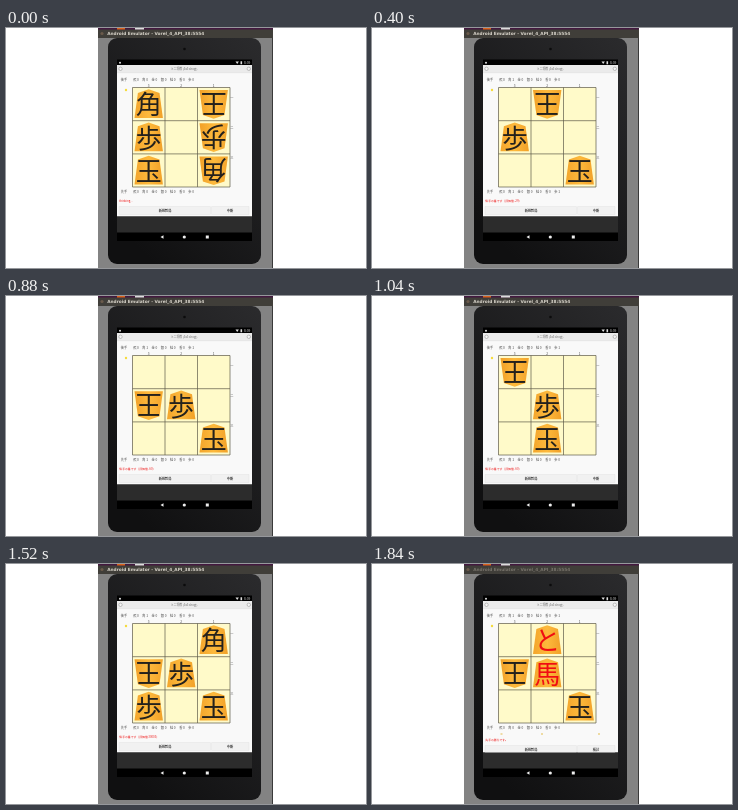
An HTML page that plays this animation: 360x240 px, repeating every 1.92 s.

```html
<!DOCTYPE html>
<html lang="ja">
<head>
<meta charset="utf-8">
<title>3x3 shogi</title>
<style>
html, body { margin: 0; width: 100%; height: 100%; overflow: hidden; background: #fff; }
svg { display: block; width: 360px; height: 240px; }
text { font-family: "Noto Sans CJK JP", "Noto Sans CJK", "Noto Sans", sans-serif; }
.tiny { font-size: 3.2px; fill: #444; }
.mid { text-anchor: middle; }
.title { font-size: 2.9px; fill: #666; }
.caption { font: 700 4.3px "DejaVu Sans", sans-serif; fill: #d8d4ca; }
.piece text { font-size: 26px; font-weight: 500; text-anchor: middle; fill: #24211c; }
.piece.up text { fill: #f00d12; }
.over .caption { fill: #77736b; }
.over #note, .over #buttons { transform: translateY(3px); }
#marks { display: none; }
.over #marks { display: inline; }
</style>
</head>
<body>
<svg id="stage" viewBox="0 0 360 240">
  <defs>
    <linearGradient id="wood" x2="1" y2="0">
      <stop offset="0" stop-color="#f3a52c"/>
      <stop offset=".5" stop-color="#fdb93c"/>
      <stop offset="1" stop-color="#f1a028"/>
    </linearGradient>
    <linearGradient id="body" x1="1" y1="0" x2=".3" y2="1">
      <stop offset="0" stop-color="#2b2b2d"/>
      <stop offset="1" stop-color="#101011"/>
    </linearGradient>
  </defs>

  <!-- emulator window -->
  <rect x="92" width="175" height="240" fill="#838383"/>
  <rect x="266" width="1" height="240" fill="#3a3a3a"/>
  <rect x="92" width="175" height="10" fill="#403e39"/>
  <rect x="92" width="175" height="1.500" fill="#43183f"/>
  <rect x="111" width="8" height="1.500" fill="#d9641e"/>
  <rect x="129" width="9" height="1.500" fill="#ddd"/>
  <circle cx="96" cy="5.500" r="1.600" fill="#6b5a4b"/>
  <text class="caption" x="101.200" y="7.400">Android Emulator - Vorel_4_API_38:5554</text>

  <!-- tablet -->
  <rect x="102" y="10" width="153" height="226" rx="9" fill="url(#body)"/>
  <circle cx="178.500" cy="21" r="1.300" fill="#0b0b0c"/>
  <rect x="111" y="31.500" width="135" height="181.500" fill="#000"/>
  <g fill="#ddd">
    <circle cx="114" cy="34.700" r="1"/>
    <path d="M229.500 33.500h3.400l-1.700 2.600zM234.500 33.300h1.600v3h-1.600z"/>
    <text x="238" y="36.200" font-size="3.300">8:39</text>
  </g>
  <rect x="111" y="188" width="135" height="16.500" fill="#2c2c2c"/>
  <g fill="#eee">
    <path d="M154.500 209l3-1.700v3.400z"/>
    <circle cx="178.300" cy="209" r="1.600"/>
    <rect x="199.800" y="207.500" width="3" height="3"/>
  </g>

  <!-- app -->
  <rect x="111" y="37" width="135" height="151.500" fill="#f9f9f9"/>
  <rect x="111" y="37" width="135" height="7.500" fill="#ebebeb"/>
  <path d="M111 44.700h135" stroke="#d6d6d6" stroke-width=".5"/>
  <g fill="#f6f6f6" stroke="#888" stroke-width=".5">
    <circle cx="114.500" cy="40.800" r="1.700"/>
    <circle cx="242.800" cy="40.800" r="1.700"/>
  </g>
  <text class="title mid" x="178" y="41.900">ミニ将棋 (3x3 shogi)</text>
  <text class="tiny mid" x="118" y="52.500">後手</text>
  <text class="tiny mid" x="118" y="164.500">先手</text>
  <g id="buttons">
    <path d="M113 178.500h91.500v8h-91.500zM205.500 178.500h37.500v8h-37.500z" fill="#f1f1f1" stroke="#dedede" stroke-width=".4"/>
    <text class="tiny mid" x="159" y="183.800" font-weight="700">新規対局</text>
    <text class="tiny mid" x="224" y="183.800" font-weight="700" id="stop"></text>
  </g>
  <rect x="111" y="188.500" width="135" height="3" fill="#2c2c2c"/>
  <g id="hands"></g>
  <circle cx="120" cy="62" r="1.200" fill="#f5dc3c"/>
  <path id="marks" d="M128.500 169.500h2v1h-2zM169 169.500h2v1h-2zM226 169.500h2v1h-2z" fill="#e3bd4e"/>
  <text x="113.300" y="174" font-size="2.850" fill="#e11" id="note"></text>

  <rect x="126.500" y="59.500" width="97.500" height="99.500" fill="#fffac9"/>
  <path d="M126.500 59.500h97.500v99.500h-97.500zM159 59.500v99.500M191.500 59.500v99.500M126.500 92.700h97.500M126.500 125.900h97.500" fill="none" stroke="#5d5a48" stroke-width=".7"/>
  <g id="labels"></g>
  <g id="board"></g>
</svg>
<script>
const STEP = 80, COUNT = 24;
const KINDS = [..."飛角金銀桂香歩"];
const UP = { 歩: "と", 角: "馬" };
const BASE = { と: "歩", 馬: "角" };
const $ = id => document.getElementById(id);

// Column and row pairs; "*" drops from hand, "+" promotes.
const MOVES = ("00-22+ 20-10 02-12 21-22+ 12-22 10-01 角*11 角*02 歩*12 02-11+ 12-11 01-00 " +
  "22-12 歩*21 角*20 21-22+ 12-22 00-01 歩*02 01-02 11-10+ 02-01 20-11+").split(" ");
const SCORES = [-29, -29, -29, -44, -100, -60, -60, -82, 30001, 30003, 30003];

function play(state, move, side) {
  const cells = { ...state.cells };
  const hands = state.hands.map(h => ({ ...h }));
  const [from, to] = move.replace("+", "").split(/[-*]/);
  let { kind } = cells[from] || { kind: from };
  if (move.includes("*")) hands[side][kind]--;
  else delete cells[from];
  const taken = cells[to];
  if (taken) {
    const k = BASE[taken.kind] || taken.kind;
    hands[side][k] = (hands[side][k] || 0) + 1;
  }
  if (move.endsWith("+")) kind = UP[kind];
  cells[to] = { kind, side };
  return { cells, hands };
}

const start = { cells: {}, hands: [{}, {}] };
[..."角歩玉"].forEach((kind, r) => start.cells["0" + r] = { kind, side: 0 });
[..."王歩角"].forEach((kind, r) => start.cells["2" + r] = { kind, side: 1 });
const states = [start];
MOVES.forEach((m, i) => states.push(play(states[i], m, i % 2)));

function drawPiece(pos, { kind, side }) {
  const x = 142.7 + 32.5 * pos[0], y = 76 + 33.2 * pos[1];
  return `<g class="piece ${BASE[kind] ? "up" : ""}" transform="translate(${x} ${y}) rotate(${side * 180})">
    <path d="M0-14.700L10.800-11L14.200 14H-14.200L-10.800-11z" fill="url(#wood)"/>
    <text y="10.300">${kind}</text></g>`;
}

function drawHand(hand, y) {
  return KINDS.map((k, i) =>
    `<text class="tiny mid" x="${130 + i * 9.2}" y="${y}">${k} ${hand[k] || 0}</text>`).join("");
}

function note(n) {
  if (n === COUNT - 1) return "先手の勝ちです。";
  return n % 2 ? `後手の番です（評価値 ${SCORES[(n - 1) / 2]}）` : "thinking...";
}

$("labels").innerHTML = [0, 1, 2].map(i =>
  `<text class="tiny mid" x="${142.7 + i * 32.5}" y="58.500">${3 - i}</text>
   <text class="tiny mid" x="225.800" y="${70.500 + i * 30}">${"一二三"[i]}</text>`).join("");

let shown = -1;
function render(n) {
  const { cells, hands } = states[n];
  const over = n === COUNT - 1;
  $("stage").classList.toggle("over", over);
  $("board").innerHTML = Object.entries(cells).map(e => drawPiece(...e)).join("");
  $("hands").innerHTML = drawHand(hands[1], 52.5) + drawHand(hands[0], 164.5);
  $("note").textContent = note(n);
  $("stop").textContent = over ? "検討" : "中断";
}

const t0 = performance.now();
function tick() {
  const n = Math.floor((performance.now() - t0) / STEP) % COUNT;
  if (n !== shown) render(shown = n);
  requestAnimationFrame(tick);
}
tick();
</script>
</body>
</html>
```
